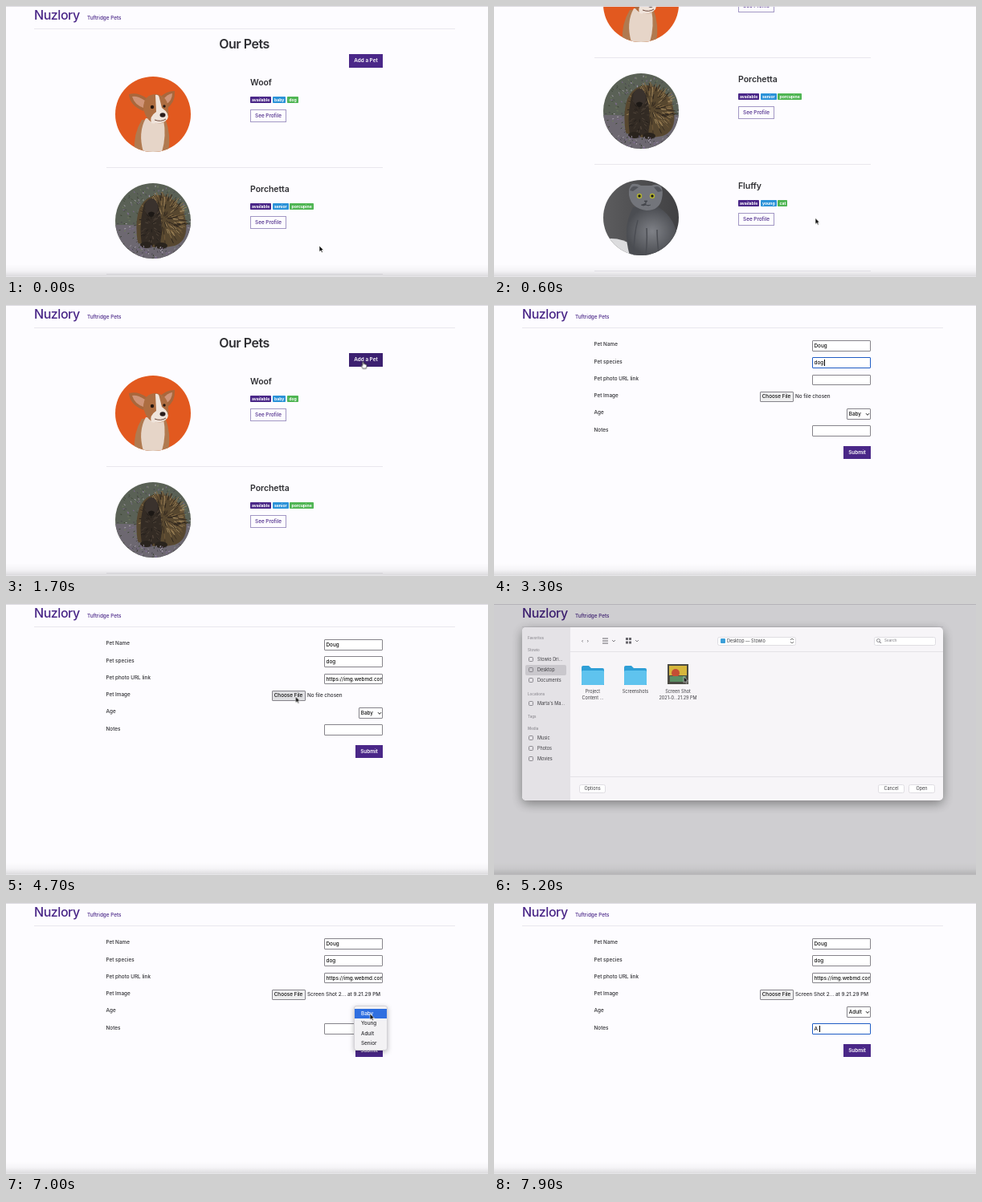
Animation of 600x338 px, one loop 8 s. Source, as an HTML page:

```html
<!DOCTYPE html>
<html lang="en">
<head>
<meta charset="utf-8">
<title>Pet adoption</title>
<style>
html, body { margin: 0; width: 100%; height: 100%; overflow: hidden; background: #fdfcff; }
#stage { position: relative; width: 600px; height: 338px; overflow: hidden; background: #fdfcff;
  font: 500 6.35px/10px Inter, "Open Sans", sans-serif; color: #2f2f33; --purple: #4a2788; }
#stage * { box-sizing: border-box; }
#stage div, #stage svg.at { position: absolute; white-space: nowrap; }
.layer { inset: 0; }
.brand { left: 35px; top: 1px; font-size: 16px; line-height: 20px; letter-spacing: -.45px; color: var(--purple); }
.nav { left: 101px; top: 9.5px; color: var(--purple); }
.rule { height: 1px; background: #e9e7ed; left: 124.5px; width: 344.5px; }
.rule.wide { left: 35px; width: 524px; top: 28px; }
.title { left: 0; width: 593px; top: 36.5px; text-align: center; font-size: 16px; line-height: 20px; font-weight: 600; letter-spacing: -.5px; }
.btn { height: 16.5px; line-height: 16.5px; text-align: center; color: #fff; background: var(--purple); font-weight: 600; }
.btn.hover { background: #3c2070; }
.btn.line { left: 304px; width: 45px; line-height: 15px; background: none; border: 1px solid #a297c4; color: var(--purple); font-weight: 500; }
.pet { left: 304px; font-size: 10.5px; line-height: 14px; font-weight: 600; letter-spacing: -.05px; }
.badges { left: 304px; display: flex; gap: 1.8px; }
.badges span { padding: 0 2px; font-size: 5.1px; line-height: 8px; font-weight: 700; color: #fff; border-radius: .8px; background: var(--purple); }
.badges span:nth-child(2) { background: #2b92d8; }
.badges span:nth-child(3) { background: #4fb553; }
.label { left: 124.5px; }
.field { left: 396px; width: 73px; height: 13.5px; padding-left: 1.5px; line-height: 12px; overflow: hidden; color: #111; background: #fff; border: 1px solid #85838a; border-radius: 1px; }
.field.focus { border: 1.4px solid #1f5cc4; line-height: 12px; }
.field.focus::after { content: ""; display: inline-block; width: .7px; height: 7.5px; margin-left: .4px; background: #000; vertical-align: -1.4px; }
.file { left: 330.5px; top: 108px; width: 42px; height: 12.5px; line-height: 11px; text-align: center; color: #111; background: #efeff0; border: 1px solid #85838a; border-radius: 1px; }
.file.hover { background: #dfdfe2; }
.chosen { left: 375px; top: 109.3px; }
.select { left: 439px; top: 129px; width: 30px; height: 13.5px; padding-left: 1.8px; line-height: 12px; color: #111; background: #fff; border: 1px solid #85838a; border-radius: 1px; }
.menu { left: 433px; top: 128px; width: 42px; height: 56px; padding: 3px 0; background: #f3f2f4; border: 1px solid #d4d2d7; border-radius: 3px; box-shadow: 0 2px 6px #0004; }
.menu span { display: block; padding-left: 8px; line-height: 12.3px; }
.menu span.pick { background: #2f6fe0; color: #fff; }

.edge { left: 0; width: 600px; pointer-events: none; }
.edge.top { top: 0; height: 1px; background: #dddbe1; }
.edge.bottom { bottom: 0; height: 16px; background: linear-gradient(#0000, #00000008 50%, #00000020 92%, #0001); }

#sheet { background: #0000002e; opacity: 0; font-size: 5.5px; font-weight: 400; color: #3d3c40; animation: sheet 8s linear infinite; }
.panel { left: 35px; top: 29px; width: 524px; height: 216px; overflow: hidden; background: #f7f5f8; border-radius: 5px; }
.shadow { left: 35px; top: 29px; width: 524px; height: 216px; border-radius: 5px; box-shadow: 0 4px 14px #0006; }
.side { left: 0; top: 0; width: 60px; height: 216px; background: #e4e2e6; }
.head { font-size: 4.5px; font-weight: 600; color: #97959b; }
.sel { background: #c9c7cc; border-radius: 2px; }
.split { background: #e4e2e7; }
.box { height: 11px; line-height: 9px; text-align: center; background: #fff; border: 1px solid #dfdde2; border-radius: 2.5px; }
.name { width: 60px; text-align: center; line-height: 7.6px; }

#scroll { animation: scroll 8s linear infinite; }
#cursor { left: -.9px; top: 0; width: 0; height: 0; animation: move 8s ease-in-out infinite; }
#cursor svg { position: absolute; overflow: visible; }

@keyframes scroll {
  0%, 2% { transform: none; animation-timing-function: ease-in-out; }
  7%, 12% { transform: translateY(-137px); animation-timing-function: ease-in-out; }
  17.5%, 100% { transform: none; }
}
@keyframes sheet {
  0%, 59.5% { opacity: 0; }
  62.5%, 75.6% { opacity: 1; }
  77.5% { opacity: .28; }
  79.4%, 100% { opacity: 0; }
}
@keyframes move {
  0% { transform: translate(391px, 299px); }
  7.5%, 12% { transform: translate(401px, 264.5px); }
  20%, 25% { transform: translate(445.5px, 70.5px); }
  31%, 49% { transform: translate(432px, 51px); }
  56%, 60% { transform: translate(361.5px, 115.5px); }
  66%, 68.5% { transform: translate(230px, 89px); }
  74%, 75.5% { transform: translate(532px, 232px); }
  77.5% { transform: translate(535px, 243px); }
  85.5%, 87% { transform: translate(454px, 136px); }
  89.5%, 91% { transform: translate(455px, 160px); }
  94%, 100% { transform: translate(432px, 157px); }
}
</style>
</head>
<body>
<div id="stage">
  <div class="layer" id="list"><div class="layer" id="scroll"></div></div>
  <div class="layer" id="form"></div>
  <div class="edge top"></div>
  <div class="edge bottom"></div>
  <div class="layer" id="sheet"><div class="shadow"></div><div class="panel" id="panel"></div></div>
  <div id="cursor">
    <svg id="arrow"><path d="M0 0V7.6L1.8 6L3 8.6L4.3 8L3.1 5.5H5.4Z" fill="#111" stroke="#fff" stroke-width=".6"/></svg>
    <svg id="hand"><path d="M-.9 .6Q0-.6 .9 .6V3.2Q2-.0 2.4 3.5Q3.6 2.6 3.8 4Q4.8 3.6 4.7 5.2Q4.7 7 3.7 8.8H-.3Q-1.6 6.8-2.6 5.3Q-2.4 4.2-.9 5.4Z" fill="#fff" stroke="#111" stroke-width=".7"/></svg>
    <svg id="beam"><path d="M-1.5-4Q0-4 0-3V3Q0 4-1.5 4M1.5-4Q0-4 0-3M0 3Q0 4 1.5 4" fill="none" stroke="#222" stroke-width=".7"/></svg>
  </div>
</div>
<script>
const LOOP = 8000;
const $ = id => document.getElementById(id);
const div = (cls, style, html = "", id = "") => `<div class="${cls}" id="${id}" style="${style}">${html}</div>`;
const header = div("brand", "", "Nuzlory") + div("nav", "", "Tuftridge Pets") + div("rule wide", "");

let seed = 7;
const rnd = () => (seed = seed * 16807 % 2147483647) / 2147483647;

// Short strokes scattered inside an ellipse, pointing away from its centre
function strokes(n, cx, cy, rx, ry, len, colors) {
  let out = "";
  for (let i = 0; i < n; i++) {
    const a = rnd() * 2 * Math.PI, r = Math.sqrt(rnd());
    const x = cx + rx * r * Math.cos(a), y = cy + ry * r * Math.sin(a);
    out += `<path d="M${x.toFixed(1)} ${y.toFixed(1)}l${(len * Math.cos(a)).toFixed(1)} ${(len * Math.sin(a)).toFixed(1)}" stroke="${colors[i % colors.length]}"/>`;
  }
  return out;
}

const dog = `<rect width="94" height="94" fill="#e2591f"/>
  <path d="M24 94Q22 72 33 54L62 52Q70 72 66 94Z" fill="#b07a50"/>
  <path d="M35 94Q28 70 38 52L60 54Q64 74 58 94Z" fill="#e6d5c8"/>
  <path d="M39 27Q28 19 17 22Q18 36 35 43Z" fill="#a8673c"/>
  <path d="M37 30Q28 24 21 25Q24 35 35 39Z" fill="#cf9478"/>
  <path d="M56 26Q63 18 74 18Q75 32 64 40Z" fill="#a8673c"/>
  <path d="M60 28Q65 22 71 21Q71 30 63 35Z" fill="#cf9478"/>
  <path d="M35 40Q35 22 51 22Q66 24 66 42Q68 54 58 58Q40 62 35 40Z" fill="#ad6d41"/>
  <path d="M50 23Q54 22 55 27L58 39Q68 46 65 53Q58 61 45 58Q42 50 51 44Z" fill="#efe3da"/>
  <circle cx="46" cy="38" r="2.200" fill="#25160f"/><circle cx="61" cy="37" r="1.700" fill="#25160f"/>
  <ellipse cx="59" cy="48" rx="3.500" ry="2.700" fill="#2a1d1c"/>
  <path d="M49 54Q57 57 63 53" fill="none" stroke="#6b4639"/>`;

const porcupine = `<rect width="94" height="94" fill="#5a6156"/><rect y="52" width="94" height="42" fill="#6d6871"/>
  ${strokes(260, 47, 50, 46, 46, 2, ["#3c4635", "#a9a3ad", "#7e6a92", "#39402f", "#6f7c5c", "#4a464e"])}
  <path d="M28 74Q24 50 30 32Q38 14 56 15Q84 20 88 48Q91 72 74 78Q46 84 28 74Z" fill="#57472f"/>
  ${strokes(200, 60, 44, 26, 28, 6, ["#8b7148", "#3a2e22", "#705838", "#2c241c", "#a0875c"])}
  <path d="M33 76Q29 50 36 26Q45 14 54 28Q60 52 56 77Z" fill="#332b24"/>
  ${strokes(50, 45, 52, 11, 24, 4, ["#453b31", "#231e1a", "#51453a"])}
  <ellipse cx="45" cy="30" rx="8" ry="11" fill="#3a322d"/>
  <path d="M41 37Q45 34 49 37Q48 42 45 42Q41 42 41 37Z" fill="#1c1815"/>
  <ellipse cx="39" cy="77" rx="8" ry="4" fill="#29231d"/><ellipse cx="57" cy="78" rx="8" ry="4" fill="#29231d"/>
  ${strokes(60, 47, 86, 40, 7, 2, ["#98929d", "#4a464e", "#7e6a92"])}`;

const cat = `<defs><radialGradient id="fur"><stop stop-color="#7f8187"/><stop offset="1" stop-color="#4b4d52"/></radialGradient>
  <linearGradient id="wall"><stop stop-color="#5c5c5e"/><stop offset="1" stop-color="#414143"/></linearGradient></defs>
  <rect width="94" height="94" fill="url(#wall)"/>
  <path d="M0 74Q20 70 38 82V94H0Z" fill="#dcdcde"/>
  <path d="M33 94Q23 60 37 34H69Q91 48 93 76Q92 90 80 94Z" fill="url(#fur)"/>
  <path d="M38 94Q38 68 43 50M53 94Q55 76 54 60M69 92Q67 74 67 62" fill="none" stroke="#4b4d53" stroke-width="1.500"/>
  <path d="M32 19Q31 9 36 5Q42 4 47 7H60Q67 4 72 8Q75 14 73 23Q70 38 54 38Q35 36 32 19Z" fill="#73757b"/>
  <path d="M33 13Q36 5 44 9L37 14ZM63 9Q70 6 73 14L68 15Z" fill="#53555b"/>
  <circle cx="45" cy="20" r="3.200" fill="#b4b432"/><circle cx="61" cy="20" r="3.200" fill="#b4b432"/>
  <circle cx="45" cy="20" r="1.700" fill="#171717"/><circle cx="61" cy="20" r="1.700" fill="#171717"/>
  <path d="M51 26H55L53 28.500ZM53 28.500V31Q50 33 47 31M53 31Q56 33 59 31" fill="#45474d" stroke="#45474d" stroke-width=".8"/>`;

const pets = [
  ["Woof", ["available", "baby", "dog"], dog],
  ["Porchetta", ["available", "senior", "porcupine"], porcupine],
  ["Fluffy", ["available", "young", "cat"], cat],
];

$("scroll").innerHTML = header + div("title", "", "Our Pets") +
  div("btn", "left:427px;top:60px;width:42px", "Add a Pet", "add") +
  pets.map(([name, tags, art], i) => {
    const y = 133 * i;
    return `<svg class="at" style="left:136px;top:${88 + y}px;border-radius:50%" width="94" height="94">${art}</svg>` +
      div("pet", `top:${89 + y}px`, name) +
      div("badges", `top:${113 + y}px`, tags.map(s => `<span>${s}</span>`).join("")) +
      div("btn line", `top:${128.5 + y}px`, "See Profile") +
      div("rule", `top:${201 + y}px`);
  }).join("");

const labels = ["Pet Name", "Pet species", "Pet photo URL link", "Pet Image", "Age", "Notes"];
const fields = { pet: 44, species: 65.2, url: 86.5, notes: 150.2 };
const ages = ["Baby", "Young", "Adult", "Senior"];

$("form").innerHTML = header +
  labels.map((s, i) => div("label", `top:${44.2 + 21.3 * i}px`, s)).join("") +
  Object.entries(fields).map(([id, y]) => div("field", `top:${y}px`, "", id)).join("") +
  div("file", "", "Choose File", "file") + div("chosen", "", "", "chosen") +
  div("select", "", `<span id="age"></span><svg class="at" style="left:22px;top:4px" width="6" height="5"><path d="M1 1.200L3 3.400L5 1.200" fill="none" stroke="#222" stroke-width="1"/></svg>`) +
  div("btn", "left:435px;top:175.5px;width:34px", "Submit") +
  div("menu", "", ages.map(s => `<span>${s}</span>`).join(""), "menu");

// Panel helpers take stage coordinates
const at = (x, y) => `left:${x - 35}px;top:${y - 34}px;`;
const text = (x, y, s, cls = "") => div(cls, at(x, y), s);
const rect = (x, y, w, h, cls, s = "", id = "") => div(cls, `left:${x - 35}px;top:${y - 29}px;width:${w}px;height:${h}px`, s, id);
const art = (x, y, body) => `<svg class="at" style="left:${x - 35}px;top:${y - 29}px" width="30" height="28">${body}</svg>`;
const folder = x => art(x, 76, `<path d="M0 3Q0 1 2 1H9L12 4H26Q28 4 28 6V25H0Z" fill="#2f9fd6"/><rect y="7" width="28" height="18" rx="1.500" fill="#5fc3ee"/>`);
const heads = [["Favorites", 43], ["Stowio", 58], ["Locations", 113], ["Tags", 141], ["Media", 156]];
const places = [["Stowio Dri...", 69], ["Desktop", 82], ["Documents", 95], ["Marta's Ma...", 124], ["Music", 167], ["Photos", 180], ["Movies", 193]];

$("panel").innerHTML = div("side", "") + rect(39, 75.5, 51, 13, "sel") +
  heads.map(([s, y]) => text(42, y, s, "head")).join("") +
  places.map(([s, y]) => text(54, y, s) + art(43, y - 3, `<rect x=".5" y=".5" width="5" height="5" rx="1" fill="none" stroke="#77757c" stroke-width=".8"/>`)).join("") +
  text(109, 46, "‹ &nbsp; ›") +
  art(134, 42, `<path d="M1 1h7M1 4h7M1 7h7" stroke="#67656b"/><path d="M13 3l2 2 2-2" fill="none" stroke="#67656b" stroke-width=".8"/>`) +
  art(163, 42, `<path d="M1 1.500h7M1 6h7" stroke="#67656b" stroke-width="3" stroke-dasharray="3 1"/><path d="M13 3l2 2 2-2" fill="none" stroke="#67656b" stroke-width=".8"/>`) +
  rect(278, 40.5, 98, 11, "box") + rect(282, 43, 6, 6, "", `<svg class="at" width="6" height="6"><rect width="6" height="6" rx="1" fill="#3b9fd8"/></svg>`) +
  text(290, 46, "Desktop — Stowio") +
  art(368, 42, `<path d="M1 3l2-2 2 2M1 5l2 2 2-2" fill="none" stroke="#555" stroke-width=".8"/>`) +
  rect(473, 40.5, 77, 11, "box") + text(486, 46, "Search", "head") +
  art(476, 43, `<circle cx="2.500" cy="2.500" r="2" fill="none" stroke="#77757c" stroke-width=".8"/><path d="M4 4l2 2" stroke="#77757c"/>`) +
  rect(95, 59, 464, 1, "split") + rect(95, 215, 464, 1, "split") +
  rect(212, 70, 34, 34, "sel", "", "pickA") + rect(203, 106, 52, 16, "sel", "", "pickB") +
  folder(109) + folder(162) +
  art(216, 75, `<rect width="26" height="25" fill="#4b4a43"/><rect x="2" y="2" width="22" height="12" fill="#d6b63c"/><circle cx="10" cy="11" r="5" fill="#c44e35"/><rect x="3" y="15" width="20" height="7" fill="#5b8f64"/>`) +
  rect(93, 106, 60, 16, "name", "Project<br>Content ...") + rect(146, 106, 60, 8, "name", "Screenshots") +
  rect(199, 106, 60, 16, "name", "Screen Shot<br>2021-0...21.29 PM") +
  rect(106, 224.5, 33, 11, "box", "Options") + rect(478, 224.5, 33, 11, "box", "Cancel") + rect(516, 224.5, 33, 11, "box", "Open");

// [field, text, focus from, focus until, first key, ms per key]
const typing = [
  ["pet", "Doug", 2500, 3000, 2650, 100],
  ["species", "dog", 3000, 3500, 3100, 100],
  ["url", "https://img.webmd.com/dogs", 3500, 4700, 3800, 0],
  ["notes", "A ", 7500, LOOP, 7700, 100],
];
const show = (id, yes) => { $(id).style.visibility = yes ? "visible" : "hidden"; };

function render(t) {
  const on = (a, b = LOOP) => t >= a && t < b;
  $("list").style.display = on(0, 2050) ? "" : "none";
  $("form").style.display = on(2050) ? "" : "none";
  $("add").classList.toggle("hover", on(1550));
  $("file").classList.toggle("hover", on(4350, 4800));

  for (const [id, str, from, until, first, step] of typing) {
    const n = t < first ? 0 : step ? Math.floor((t - first) / step) + 1 : str.length;
    $(id).textContent = str.slice(0, n).replace(/ /g, "\u00a0");
    $(id).classList.toggle("focus", on(from, until));
  }
  $("chosen").textContent = on(6350) ? "Screen Shot 2... at 9.21.29 PM" : "No file chosen";
  $("age").textContent = on(7300) ? "Adult" : "Baby";
  show("menu", on(6900, 7300));
  const pick = on(7140) ? 2 : on(7040) ? 1 : 0;
  [...$("menu").children].forEach((s, i) => s.classList.toggle("pick", i === pick));
  show("pickA", on(5400));
  show("pickB", on(5400));

  const hand = on(1550, 2050), beam = on(2400, 2650) || on(7450, 7700);
  const hidden = on(2650, 4000) || on(7700);
  show("hand", hand);
  show("beam", beam);
  show("arrow", !hand && !beam && !hidden);
}

let start;
function tick(now) {
  start ??= now;
  render((now - start) % LOOP);
  requestAnimationFrame(tick);
}
render(0);
requestAnimationFrame(tick);
</script>
</body>
</html>
```
